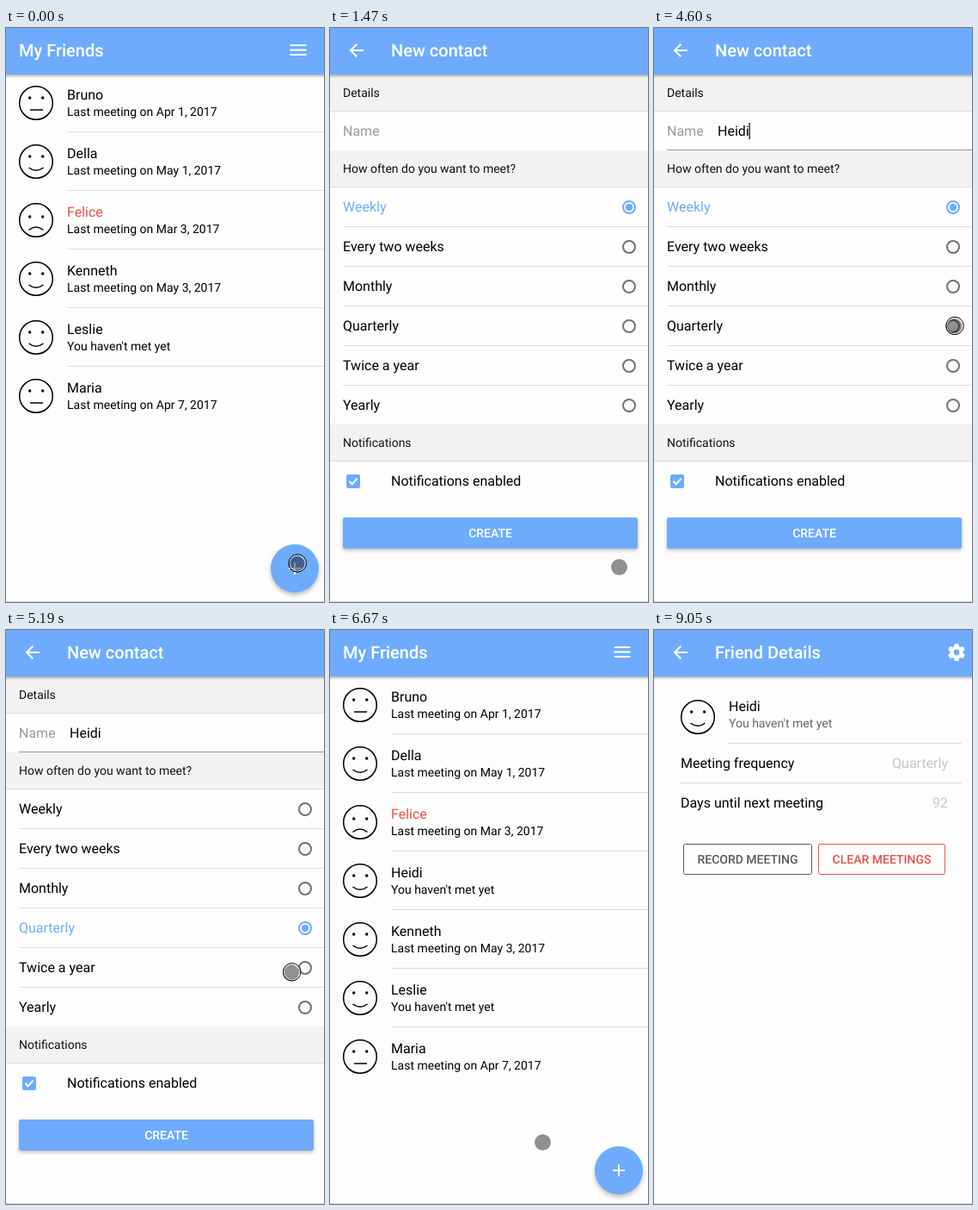
An HTML page that plays this animation: 370 by 666 pixels, repeating every 9500 ms.

```html
<!DOCTYPE html>
<html lang="en">
<head>
<meta charset="utf-8">
<title>My Friends</title>
<style>
html, body { margin: 0; height: 100%; overflow: hidden; background: #fdfdfd; }
svg { display: block; width: 370px; height: 666px; font-family: Roboto, sans-serif; text-rendering: geometricPrecision; }
.raised { filter: drop-shadow(0 2px 2px rgba(0,0,0,.26)); }
.floating { filter: drop-shadow(0 3px 2.5px rgba(0,0,0,.26)); }
</style>
</head>
<body>
<svg id="stage" viewBox="0 0 370 666"></svg>
<script>
const LOOP = 9500, TICK = LOOP / 64;
const BLUE = '#6eabfd', RED = '#e5524b', LINE = '#dcdcdc', PAPER = '#fdfdfd';
const NEW_NAME = 'Heidi';
const stage = document.getElementById('stage');
const meter = document.createElement('canvas').getContext('2d');

const text = (x, y, s, size = 16, fill = '#000', extra = '') =>
  `<text x="${x}" y="${y}" font-size="${size}" fill="${fill}" ${extra}>${s}</text>`;
const rect = (x, y, w, h, fill, extra = '') =>
  `<rect x="${x}" y="${y}" width="${w}" height="${h}" fill="${fill}" ${extra}/>`;
const circle = (x, y, r, extra) => `<circle cx="${x}" cy="${y}" r="${r}" ${extra}/>`;
const ring = (x, y, r, stroke, width) =>
  circle(x, y, r, `fill="none" stroke="${stroke}" stroke-width="${width}"`);
const path = (d, stroke, width) =>
  `<path d="${d}" fill="none" stroke="${stroke}" stroke-width="${width}"/>`;
const rule = (x, y, end = 370, color = LINE) => rect(x, y, end - x, 1, color);
const MEDIUM = 'font-weight="500"', MIDDLE = MEDIUM + ' text-anchor="middle"', RIGHT = 'text-anchor="end"';

// Height of the eyes and shape of the mouth
const MOODS = {
  flat: [-6, 'M-7 8H8'],
  smile: [-6, 'M-8.5 7Q0 13.5 8.5 7'],
  frown: [-4, 'M-8.5 11.5Q0 4.5 8.5 11.5']
};

function face(x, y, mood) {
  const [eyes, mouth] = MOODS[mood];
  return `<g transform="translate(${x} ${y})">` + ring(0, 0, 19.3, '#000', 1.5) +
    circle(-7.3, eyes, 1.7, '') + circle(7.7, eyes, 1.7, '') + path(mouth, '#000', 1.5) + '</g>';
}

// A page: paper, content, then the title bar with its shadow on top
function page(title, x, body) {
  return '<linearGradient id="fade" x2="0" y2="1"><stop stop-opacity=".28"/>' +
    '<stop offset="1" stop-opacity="0"/></linearGradient>' +
    rect(0, 0, 370, 666, PAPER) + body + rect(0, 54, 370, 4, 'url(#fade)') +
    rect(0, 0, 370, 54, BLUE) + text(x, 33, title, 20, '#fff', MEDIUM);
}

const backArrow = path('M39 26H25M31.3 18.7L24 26L31.3 33.3', '#fff', 2);
const menu = path('M330.5 20H349.5M330.5 25.5H349.5M330.5 31H349.5', '#fff', 2);

function gear() {
  let teeth = '';
  for (let a = 0; a < 360; a += 60)
    teeth += `<path d="M-2.2 -10H2.2L3.2 -6H-3.2Z" fill="#fff" transform="rotate(${a})"/>`;
  return `<g transform="translate(352 26)">${teeth}${ring(0, 0, 5.4, '#fff', 4)}</g>`;
}

// Expanding touch feedback, clipped to its list row
function ripple(x, y, r, alpha, top, height) {
  return `<clipPath id="row">${rect(0, top, 370, height, '#000')}</clipPath>` +
    `<g clip-path="url(#row)">${circle(x, y, r, `fill="#555" opacity="${alpha}"`)}</g>`;
}

const met = date => `Last meeting on ${date}, 2017`;
const NEVER = "You haven't met yet";
const FRIENDS = [
  ['Bruno', met('Apr 1'), 'flat'],
  ['Della', met('May 1'), 'smile'],
  ['Felice', met('Mar 3'), 'frown'],
  [NEW_NAME, NEVER, 'smile'],
  ['Kenneth', met('May 3'), 'smile'],
  ['Leslie', NEVER, 'smile'],
  ['Maria', met('Apr 7'), 'flat']
];

function listPage(k) {
  const rows = FRIENDS.filter(f => k > 40 || f[0] !== NEW_NAME);
  let s = '';
  rows.forEach(([name, note, mood], i) => {
    const y = i * 68;
    s += face(35, y + 87, mood) +
      text(71, y + 83, name, 16, mood === 'frown' ? RED : '#000') + text(71, y + 102, note, 14);
    if (i < rows.length - 1) s += rule(71, y + 120);
  });
  if (k === 56 || k === 57) s += ripple(270, 283, k === 56 ? 45 : 120, .08, 256, 68);
  s += circle(336, 627, 28, `fill="${BLUE}" class="floating"`) + path('M329 627H343M336 620V634', '#fff', 2);
  return page('My Friends', 15, s) + menu;
}

function section(y, h, title) {
  return rect(0, y, 370, h, '#f2f2f2') + rule(0, y + h) + text(15, y + h - 16, title, 14, '#111');
}

function formPage(k) {
  const typed = NEW_NAME.slice(0, Math.max(0, k - 19));
  const chosen = k < 32 ? 0 : 3;
  let s = section(54, 42, 'Details') + text(15, 125, 'Name', 16, '#999') + text(74, 125, typed) +
    section(142, 42, 'How often do you want to meet?');
  if (k >= 17) s += rule(15, 141, 370, '#999');
  if (k >= 17 && k < 33) {
    meter.font = '16px Roboto, sans-serif';
    s += rect(Math.round(74 + meter.measureText(typed).width) - .5, 110, 1.2, 19, '#000');
  }
  ['Weekly', 'Every two weeks', 'Monthly', 'Quarterly', 'Twice a year', 'Yearly'].forEach((label, i) => {
    const y = 208 + i * 46, on = i === chosen;
    s += text(15, y + 5, label, 16, on ? BLUE : '#000') + ring(348, y, 7, on ? BLUE : '#737373', 2);
    if (on) s += circle(348, y, 4.2, `fill="${BLUE}"`);
    if (i < 5) s += rule(15, y + 22);
  });
  if (k === 32 || k === 33) s += ripple(348, 346, k === 32 ? 45 : 110, .07, 323, 45);
  s += section(460, 42, 'Notifications') +
    rect(19, 518, 16, 16, BLUE, 'rx="2"') + path('M22.5 526L25.7 529.3L31.7 522.7', '#fff', 2) +
    text(71, 531, 'Notifications enabled') +
    rect(15, 568, 343, 36, BLUE, 'rx="2" class="raised"') + text(186.5, 591, 'CREATE', 14, '#fff', MIDDLE);
  return page('New contact', 71, s) + backArrow;
}

function outlined(x, w, label, color) {
  return rect(x + .5, 248.5, w - 1, 35, 'none', `rx="2" stroke="${color}"`) +
    text(x + w / 2, 271, label, 14, color, MIDDLE);
}

function detailsPage() {
  const s = face(51, 101, 'smile') +
    text(87, 94, NEW_NAME) + text(87, 113, NEVER, 14, '#666') + rule(87, 131, 358) +
    text(31, 160, 'Meeting frequency') + text(342, 160, 'Quarterly', 16, '#c5c5c5', RIGHT) +
    rule(31, 177, 358) +
    text(31, 206, 'Days until next meeting') + text(342, 206, '92', 16, '#c5c5c5', RIGHT) +
    outlined(34, 150, 'RECORD MEETING', '#5a5a5a') + outlined(191, 148, 'CLEAR MEETINGS', RED);
  return page('Friend Details', 71, s) + backArrow + gear();
}

// Pages fade in while rising 40px, and fade out while sinking
function overlay(content, p) {
  return `<g opacity="${p}" transform="translate(0 ${40 * (1 - p) ** 2})">${content}</g>`;
}
const entering = n => [.08, .55, .93][n] ?? 1;

// First tick, last tick, then a cubic path for the pointer
const MOVES = [
  [12, 16, [336.5, 625.5], [300, 460], [220, 270], [180.5, 124.5]],
  [26, 31, [180.5, 124.5], [240, 190], [300, 290], [348.8, 346.3]],
  [34, 40, [348.8, 346.3], [325, 430], [270, 530], [247.5, 594.5]],
  [48, 55, [247.5, 594.5], [190, 380], [300, 130], [270.3, 282.8]]
];
const within = (k, a, b) => k >= a && k <= b;

function pointerAt(k) {
  if (k === 0) return [338, 621.8];
  const [a, b, ...pts] = MOVES.filter(m => k >= m[0]).pop() || [0, 1, ...Array(4).fill(MOVES[0][2])];
  const t = Math.min(1, (k - a + 1) / (b - a + 1)), u = t * t * (3 - 2 * t), v = 1 - u;
  const weights = [v ** 3, 3 * u * v * v, 3 * u * u * v, u ** 3];
  return [0, 1].map(axis => weights.reduce((sum, w, i) => sum + w * pts[i][axis], 0));
}

// A touch dot; while hovering, a black and white ring leads it slightly
function pointer(k) {
  if (within(k, 19, 25) || k >= 61) return '';
  const [x, y] = pointerAt(k);
  const hover = k < 4 || MOVES.some(m => within(k, m[0], m[1]));
  const dot = circle(x, y, 9.6, 'fill="#000" fill-opacity=".43"');
  if (!hover) return dot + ring(x, y, 10.2, 'rgba(255,255,255,.6)', 1.4);
  const rx = x + 1.2, ry = y - .8;
  return dot + ring(rx, ry, 9.2, 'rgba(255,255,255,.75)', 1.2) + ring(rx, ry, 10.2, '#000', 1);
}

function scene(k) {
  let s;
  if (k < 7) s = listPage(k);
  else if (k < 10) s = listPage(k) + overlay(formPage(k), entering(k - 7));
  else if (k < 43) s = formPage(k);
  else if (k < 45) s = listPage(k) + overlay(formPage(k), k === 43 ? .75 : .25);
  else if (k < 58) s = listPage(k);
  else s = listPage(k) + overlay(detailsPage(), entering(k - 58));
  return s + rule(0, 665, 370, '#d8d8d8') + pointer(k);
}

let shown = -1;
function draw(now) {
  const k = Math.min(63, Math.floor((now % LOOP + 15) / TICK));
  if (k !== shown) stage.innerHTML = scene(shown = k);
  requestAnimationFrame(draw);
}
draw(0);
</script>
</body>
</html>
```
